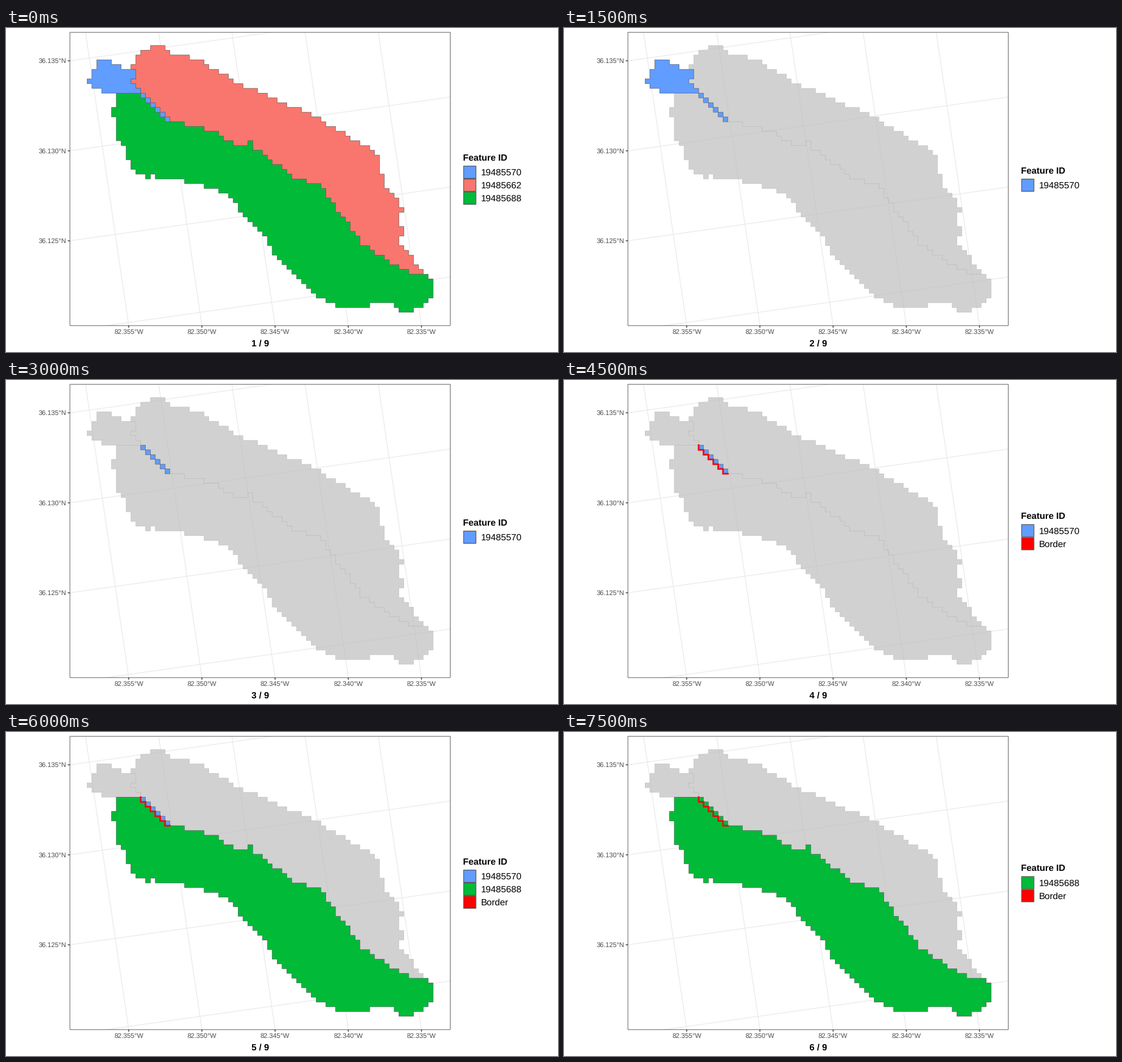
A matplotlib script that plays this animation: 976x574 px, repeating every 8000 ms.

```python
import numpy as np
import matplotlib.pyplot as plt
from matplotlib.animation import FuncAnimation
from matplotlib.colors import to_rgba
from matplotlib.patches import Polygon, Rectangle

plt.rcParams.update({
    "font.family": "Liberation Sans",
    "path.snap": False,
    "text.hinting": "none",
})

W, H, DPI = 976, 574, 96
PX = 72 / DPI                       # one pixel in points
LEFT, TOP, RIGHT, BOTTOM = 113, 7.7, 785.4, 527.2
BLUE, RED, GREEN, LINE = "#619CFF", "#F8766D", "#00BA38", "#595959"
GREY, BORDER = "#BEBEBE", "#FF0000"

fig = plt.figure(figsize=(W / DPI, H / DPI), dpi=DPI, facecolor="white")
ax = fig.add_axes([0, 0, 1, 1])
ax.set(xlim=(0, W), ylim=(H, 0))
ax.axis("off")


def stairs(*keys):
    """Join key cells by even staircases, each step across and then down."""
    path = [keys[0]]
    for a, b in zip(keys, keys[1:]):
        a, b = np.array(a), np.array(b)
        n = max(1, abs(b - a).min())
        for k in range(1, n + 1):
            x, y = np.floor(a + (b - a) * k / n + 0.5)
            path += [(x, path[-1][1]), (x, y)]
    return path


def to_px(cells):
    return np.array(cells) * (8.617, 8.441) + (143.3, 31.0)


# Arcs of the catchment map, in raster cells
west = stairs((6, 10), (3, 9), (1, 8), (0, 7), (2, 3), (7, 5), (9, 5))
notch = stairs((9, 5), (10, 7), (9, 8), (11, 10))
north = stairs((9, 5), (9, 4), (10, 2), (11, 1), (13, 0), (16, 1), (17, 2),
               (24, 4), (25, 5), (29, 7), (30, 8), (46, 15), (56, 21),
               (59, 23), (61, 30), (63, 32), (65, 35), (64, 38), (65, 40),
               (64, 42), (69, 48))
south = stairs((69, 48), (70, 49), (71, 53), (69, 55), (67, 56), (64, 55),
               (63, 54), (58, 55), (51, 54), (47, 52), (39, 44), (37, 40),
               (32, 35), (31, 33), (29, 31), (27, 30), (20, 28), (14, 27),
               (13, 28), (12, 27), (10, 26), (8, 21), (7, 20), (6, 15),
               (5, 13), (6, 10))
ridge = stairs((17, 16), (27, 19), (28, 20), (30, 21), (33, 20), (34, 22),
               (36, 23), (38, 25), (40, 26), (42, 28), (48, 30), (52, 36),
               (53, 37), (56, 42), (62, 46), (66, 48), (69, 48))
shelf = stairs((6, 10), (11, 10))
upper = stairs((11, 10), (17, 16))
lower = stairs((11, 10), (11, 11), (16, 16), (17, 16))

blue_area = west + notch + shelf[::-1]
red_area = north + ridge[::-1] + upper[::-1] + notch[::-1]
green_area = south + shelf + lower + ridge
merged_area = south + shelf + upper + ridge
cells = [[(k, k - 1), (k + 1, k - 1), (k + 1, k), (k, k)]
         for k in range(11, 17)]


def line(xs, ys, color, width, **kw):
    return ax.plot(xs, ys, color=color, lw=width * PX, **kw)[0]


def area(pts, fill, edge=LINE, zorder=4):
    return ax.add_patch(Polygon(to_px(pts), fc=fill, ec=edge, lw=0.6 * PX,
                                joinstyle="miter", zorder=zorder))


def label(x, y, text, size=12, **kw):
    return ax.text(x, y, text, fontsize=size, va="baseline", zorder=9, **kw)


def draw_panel():
    frame = ax.add_patch(Rectangle((LEFT, TOP), RIGHT - LEFT, BOTTOM - TOP,
                                   fill=False, ec="#333333", lw=0.8 * PX,
                                   joinstyle="miter", zorder=8))
    grid = dict(zorder=1, solid_capstyle="butt")
    tick = dict(zorder=7, solid_capstyle="butt")
    for k in range(5):
        x = 217 + 129.4 * k
        line([x - 76.4, x], [TOP, BOTTOM], "#EBEBEB", 1.42, **grid)
        line([x, x], [BOTTOM, BOTTOM + 3.7], "#333333", 1.42, **tick)
        label(x, 542.2, f"{82.355 - 0.005 * k:.3f}°W", 8.8, ha="center",
              color="#4D4D4D")
    for k in range(4):
        y = 58.2 + 159.4 * k
        row = line([LEFT, RIGHT], [y, y - 95.3], "#EBEBEB", 1.42, **grid)
        row.set_clip_path(frame)
        if k < 3:
            line([LEFT - 3.7, LEFT], [y, y], "#333333", 1.42, **tick)
            label(106.2, y + 3.9, f"{36.135 - 0.005 * k:.3f}°N", 8.8,
                  ha="right", color="#4D4D4D")


def draw_basin():
    for pts in [blue_area, red_area, green_area] + cells:
        area(pts, to_rgba(GREY, 0.7), GREY, zorder=2)


def legend(keys):
    n = len(keys)
    arts = [label(808.3, 269.3 - 11.5 * n, "Feature ID", weight="bold")]
    for k, (name, color) in enumerate(keys):
        y = 290 - 11.5 * n + 23 * k
        arts.append(ax.add_patch(Rectangle(
            (809.1, y - 10.9), 21.8, 21.8, fc=color, ec=LINE, lw=1.3 * PX,
            joinstyle="miter", zorder=9)))
        arts.append(label(839.9, y + 5.7, name, 12.15))
    return arts


def scene(number, areas, keys, border=False):
    arts = [area(pts, color) for pts, color in areas]
    if border:
        arts.append(line(*to_px(lower).T, "#EC0A10", 2.9, zorder=5,
                         solid_capstyle="projecting",
                         solid_joinstyle="miter"))
        keys = keys + [("Border", BORDER)]
    arts += legend(keys)
    arts.append(label(449.3, 563.4, f"{number} / 9", ha="center",
                      weight="bold"))
    return arts


draw_panel()
draw_basin()

b_key, r_key, g_key = (("19485570", BLUE), ("19485662", RED),
                       ("19485688", GREEN))
squares = [(c, BLUE) for c in cells]
blue = [(blue_area, BLUE)] + squares
scenes = [
    scene(1, [(red_area, RED), (green_area, GREEN)] + blue,
          [b_key, r_key, g_key]),
    scene(2, blue, [b_key]),
    scene(3, squares, [b_key]),
    scene(4, squares, [b_key], border=True),
    scene(5, squares + [(green_area, GREEN)], [b_key, g_key], border=True),
    scene(6, [(merged_area, GREEN)], [g_key], border=True),
]

STEP = 500          # ms per frame
HOLD = 3            # frames per scene


def update(i):
    for k, arts in enumerate(scenes):
        for art in arts:
            art.set_visible(k == i // HOLD)
    return []


anim = FuncAnimation(fig, update, frames=16, interval=STEP,
                     init_func=lambda: update(0), repeat=True)
plt.show()
```
